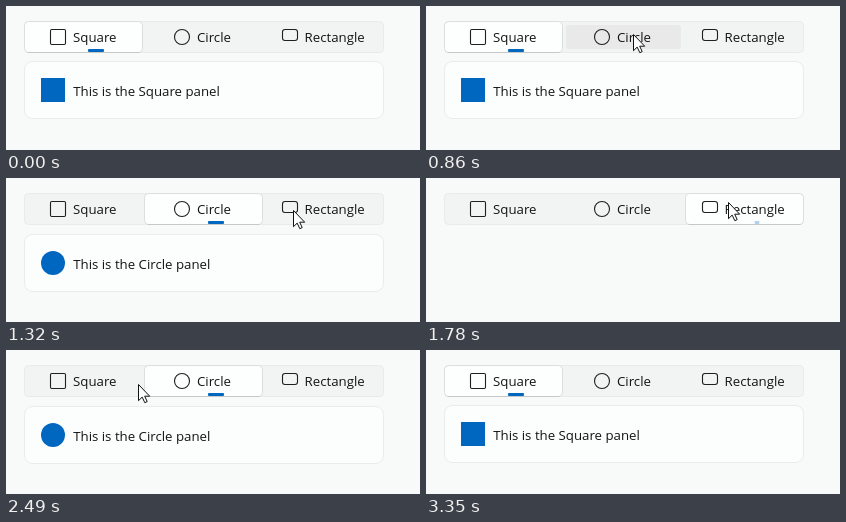
Recreate the animation shown at these times as an HTML page. Size 414 by 144 pixels, loop 3890 ms.

```html
<!DOCTYPE html>
<html lang="en">
<head>
<meta charset="utf-8">
<title>Segmented tabs</title>
<style>
  html, body { margin: 0; width: 100%; height: 100%; overflow: hidden; background: #f8f9f9; }
  svg { display: block; width: 414px; height: 144px; }
  text { font: 13.25px "Open Sans", "Noto Sans", sans-serif; fill: #141414; }
  .line { fill: none; stroke: #1f1f1f; stroke-width: 1.1; }
  .blue { fill: #0067c0; }
</style>
</head>
<body>
<svg viewBox="0 0 414 144">
  <rect x="18.5" y="15.5" width="359" height="31" rx="4" fill="#f2f3f3" stroke="#e9eaea"/>
  <rect id="hover" y="19" width="115" height="24" rx="3" fill="#e9e9e9"/>
  <rect id="tab" y="15.5" width="118" height="31" rx="4" fill="#fdfefe" stroke="#dcdddd"/>
  <path id="edge" stroke="#c6c7c7"/>
  <rect id="bar" class="blue" y="43" height="3" rx="1"/>
  <g class="line">
    <rect x="44.5" y="23.5" width="15" height="15" rx="1.2"/>
    <circle cx="176" cy="31" r="7.5"/>
    <rect x="276.5" y="23.5" width="15" height="11" rx="2.5"/>
  </g>
  <text x="67" y="36">Square</text>
  <text x="191" y="36">Circle</text>
  <text x="298.6" y="36">Rectangle</text>
  <g id="panel">
    <rect x="18.5" y="55.5" width="359" height="57" rx="8" fill="#fcfdfd" stroke="#eaebeb"/>
    <rect id="shape" class="blue" x="35" y="72" height="24"/>
    <text id="label" y="90"></text>
  </g>
  <path id="cursor" d="M.5 .5v16.2l3.7-3.6 2.6 5.6 2.4-1.1-2.5-5.4h5z" fill="#fff" stroke="#111" stroke-linejoin="round"/>
</svg>
<script>
const LOOP = 3890, STEPS = 50;
const $ = id => document.getElementById(id);
const set = (id, attrs) => {
  for (const key in attrs) $(id).setAttribute(key, attrs[key]);
};
const clamp = v => Math.max(0, Math.min(1, v));
const easeOut = f => 1 - (1 - f) ** 2;

const names = ["Square", "Circle", "Rectangle"];
const tabX = i => 18.5 + Math.floor(i * 120.5);

// The picture advances in even steps, like a screen recording.
const ENTER = 4, LEAVE = 42;
const moves = [
  { at: ENTER, steps: 7, x: 207, y: 28 },
  { at: 14, steps: 3, x: 287, y: 32 },
  { at: 17, steps: 4, x: 302, y: 24 },
  { at: 23, steps: 4, x: 220, y: 25 },
  { at: 29, steps: 3, x: 132, y: 34 },
  { at: 32, steps: 6, x: 124, y: 36 },
  { at: 38, steps: 4, x: 304, y: 131 }
];
const clicks = [
  { at: -STEPS, tab: 0 }, { at: 14, tab: 1 }, { at: 23, tab: 2 },
  { at: 29, tab: 1 }, { at: 36, tab: 0 }
];

function cursorAt(k) {
  let x = 280, y = 134;
  for (const m of moves) {
    const f = easeOut(clamp((k - m.at) / m.steps));
    x += (m.x - x) * f;
    y += (m.y - y) * f;
  }
  return { x, y };
}

function tabUnder({ x, y }) {
  const inside = i => y < 47 && x >= tabX(i) && x <= tabX(i) + 118;
  return names.findIndex((_, i) => inside(i));
}

function drawTab(i, age) {
  const grow = clamp(0.3 + age * 0.29), w = 16 * grow, x = tabX(i);
  set("tab", { x });
  set("edge", { d: `M${x + 3} 46.5h112` });
  set("bar", { x: x + 71.5 - w / 2, width: w, opacity: grow });
}

function drawPanel(i, age) {
  const drop = Math.round(21 * 0.23 ** (age - 1));
  const fade = age < 1 ? 0 : clamp(0.1 + (age - 1) * 0.83);
  const width = names[i] === "Rectangle" ? 48 : 24;
  set("panel", { transform: `translate(0 ${drop})`, opacity: fade });
  set("shape", { width, rx: names[i] === "Circle" ? 12 : 0 });
  set("label", { x: 43.2 + width });
  $("label").textContent = `This is the ${names[i]} panel`;
}

// The highlight appears once the pointer has rested on a tab for two steps.
function drawHover(k, selected) {
  const i = tabUnder(cursorAt(k));
  const shown = i >= 0 && i !== selected && i === tabUnder(cursorAt(k - 2));
  set("hover", { x: tabX(i) + 1.5, opacity: shown ? 1 : 0 });
}

function drawCursor(k) {
  const { x, y } = cursorAt(k);
  set("cursor", {
    visibility: k >= ENTER && k <= LEAVE ? "visible" : "hidden",
    transform: `translate(${Math.round(x)} ${Math.round(y)})`
  });
}

function draw(ms) {
  const k = Math.floor((ms + 12) / LOOP * STEPS) % STEPS;
  const { at, tab } = clicks.filter(c => c.at <= k).pop();
  drawTab(tab, k - at);
  drawPanel(tab, k - at);
  drawHover(k, tab);
  drawCursor(k);
}

const began = performance.now();
function tick() {
  draw((performance.now() - began) % LOOP);
  requestAnimationFrame(tick);
}
tick();
</script>
</body>
</html>
```
